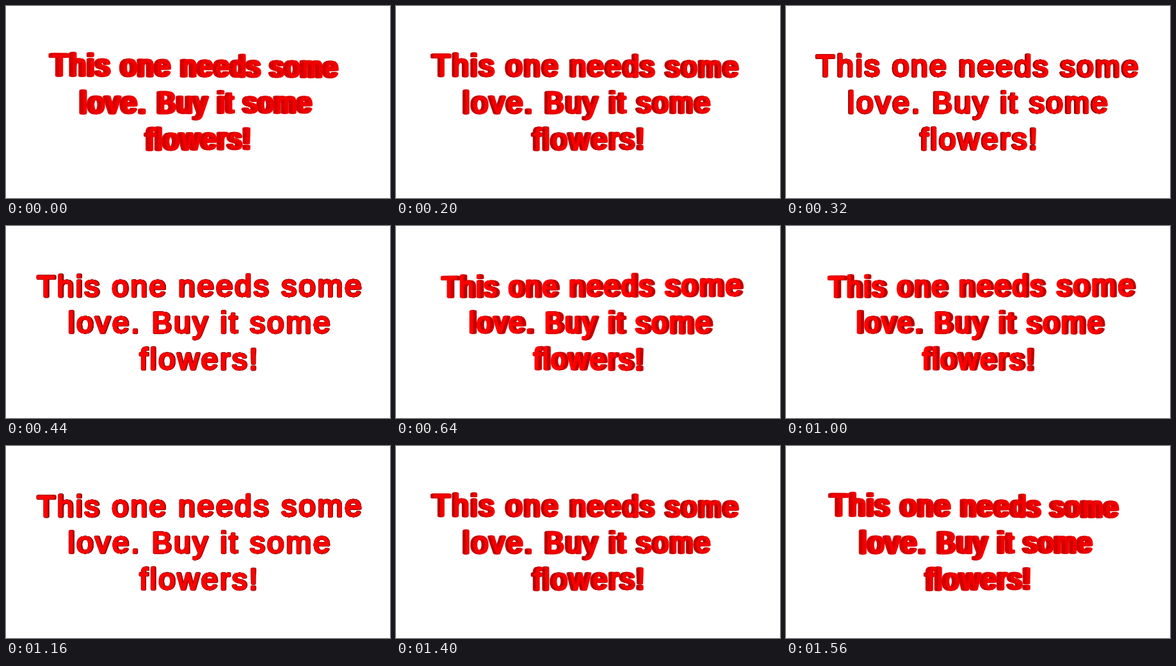
Recreate the animation shown at these times as an HTML page. Size 600 by 300 pixels, loop 1.6 s.

```html
<!DOCTYPE html>
<html lang="en">
<head>
<meta charset="utf-8">
<title>Swinging text</title>
<style>
  @property --phase {
    syntax: "<angle>";
    inherits: true;
    initial-value: 0deg;
  }
  html, body {
    margin: 0;
    width: 100%;
    height: 100%;
    overflow: hidden;
    background: #fff;
  }
  .stage {
    position: relative;
    width: 600px;
    height: 300px;
    overflow: hidden;
    perspective: 3650px;
  }
  .sign {
    --swing: cos(var(--phase));
    --side: rgb(calc(120 + 90 * max(var(--swing), -1 * var(--swing))) 0 0);
    --face: rgb(calc(255 - 14 * max(var(--swing), 0)) 0 0);
    position: absolute;
    inset: 0;
    transform-style: preserve-3d;
    transform: rotateY(calc(28.5deg * var(--swing)));
    animation: swing 1600ms steps(40) infinite;
  }
  .layer {
    position: absolute;
    inset: 0;
    width: 600px;
    height: 300px;
    font: 47px "Liberation Sans", Arial, sans-serif;
    letter-spacing: 3.3px;
    text-anchor: middle;
    fill: var(--side);
    stroke: var(--side);
    stroke-width: 2.4px;
    stroke-linejoin: round;
    transform: translateZ(var(--z));
  }
  .layer:last-child {
    fill: var(--face);
    stroke: var(--face);
  }
  @keyframes swing {
    to { --phase: 360deg; }
  }
</style>
</head>
<body>
<div class="stage"><div class="sign"></div></div>
<script>
  const LINES = ["This one needs some", "love. Buy it some", "flowers!"];
  const DEPTH = 13, LAYERS = 16;
  const sign = document.querySelector(".sign");

  function add(parent, name, attrs) {
    const el = document.createElementNS("http://www.w3.org/2000/svg", name);
    for (const key in attrs) el.setAttribute(key, attrs[key]);
    return parent.appendChild(el);
  }

  // Stack copies from back to front to form the extrusion.
  for (let i = 0; i < LAYERS; i++) {
    const z = DEPTH * (i / (LAYERS - 1) - 0.5);
    const layer = add(sign, "svg", { class: "layer", style: `--z: ${z}px` });
    LINES.forEach((line, row) => {
      add(layer, "text", { x: 302.6, y: 110 + 57 * row }).textContent = line;
    });
  }
</script>
</body>
</html>
```
